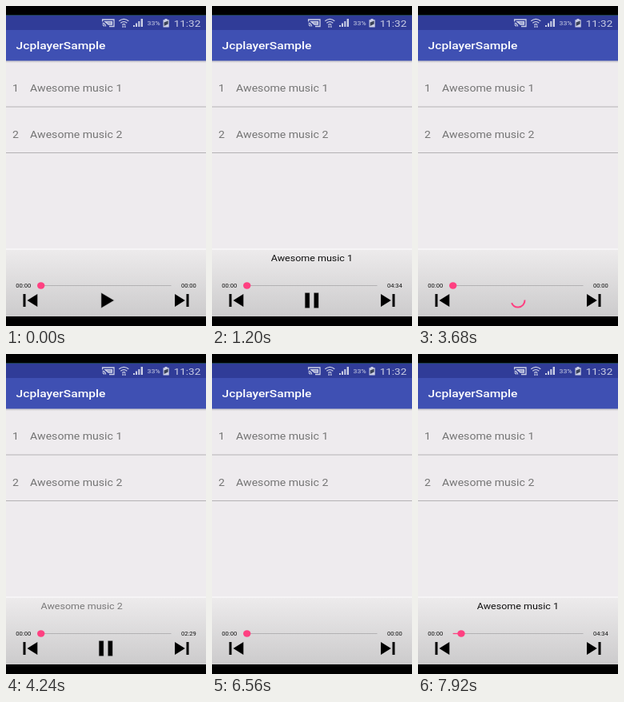
Write an HTML page that moves like this. It is 250 px wide and 400 px high and loops after 8 s.

```html
<!DOCTYPE html>
<html lang="en">
<head>
<meta charset="utf-8">
<title>Music player</title>
<style>
  html, body { margin: 0; width: 100%; height: 100%; overflow: hidden; background: #000; }
  svg { display: block; width: 100vw; height: 100vh; font-family: Roboto, "Noto Sans", sans-serif; }
  .row { font-size: 14.1px; fill: #757575; }
  .time { font-size: 7.6px; fill: #111; }
  .status { fill: #ccd0e6; }
  .icon { stroke: #000; stroke-opacity: .3; stroke-width: 1.2; }
</style>
</head>
<body>
<svg viewBox="0 0 250 400">
  <defs>
    <linearGradient id="panelFill" x2="0" y2="1">
      <stop offset="0" stop-color="#edebec"/>
      <stop offset="1" stop-color="#cccbcc"/>
    </linearGradient>
    <linearGradient id="shadowFill" x2="0" y2="1">
      <stop offset="0" stop-color="#000" stop-opacity=".16"/>
      <stop offset="1" stop-color="#000" stop-opacity="0"/>
    </linearGradient>
  </defs>
  <rect width="250" height="400"/>
  <rect y="11" width="250" height="1" fill="#1d4150"/>
  <rect y="12" width="250" height="18" fill="#303c98"/>
  <rect y="68" width="250" height="236" fill="#eeebee"/>
  <rect y="30" width="250" height="38.5" fill="#3f50b3"/>
  <rect y="68.5" width="250" height="3" fill="url(#shadowFill)"/>

  <!-- status icons -->
  <g fill="none" stroke="#ccd0e6" stroke-width="1.3">
    <path d="M120.600 19.500V17H135V25.500H129M120.600 21.500a4 4 0 0 1 4 4M120.600 23.600a2 2 0 0 1 2 2"/>
    <path d="M124 19.600H132.400V23H128z" fill="#8f97c8"/>
    <path d="M141.300 18.800q6-4.800 12 0M143.300 21.200q4-3 8 0M145.300 23.400q2-1.500 4 0M146.200 27v-2.500M148.800 27v-2.500"/>
  </g>
  <path class="status" d="M159 26v-2h2v2zM162 26v-4.500h2v4.500zM165.300 26v-7h2v7zM168.600 26v-10h2.400v10z"/>
  <path class="status" d="M198.500 16h3v1.300h2.200v9.200h-7.200v-9.200h2z"/>
  <path d="M197.600 20.500l5-2v4l-5 2.500z" fill="#3b4358"/>

  <!-- player panel -->
  <path d="M0 126H250M0 183.500H250" stroke="#b4b2b4"/>
  <rect y="304" width="250" height="84" fill="url(#panelFill)"/>
  <path d="M0 304H250" stroke="#f8f7f8" stroke-width="1.500"/>
  <path d="M43.700 349.500H206.500" stroke="#b3b1b3"/>
  <path id="played" stroke="#ff4081" stroke-width="1.300"/>
  <ellipse id="knob" fill="#ff4081" cy="349.500" rx="4.700" ry="4.200"/>
  <path d="M21.500 360h3v16h-3zM39.300 360v16L26.500 368zM228.500 360h-3v16h3zM211 360v16L223.800 368z"/>
  <path id="play" class="icon" d="M119.300 359V377L134.500 368z"/>
  <path id="pause" class="icon" d="M116.500 358.800h5.300v18.400h-5.300zM127.700 358.800h5.300v18.400h-5.300z"/>
  <ellipse id="spinner" cx="125" cy="368" rx="8.500" ry="8.500" pathLength="100" fill="none" stroke="#ff4081" stroke-width="2"/>

  <!-- the phone screen is shown slightly flattened, its lettering too -->
  <g transform="scale(1 .87)">
    <g class="status">
      <text x="176.500" y="27.600" font-size="8.800">33%</text>
      <text x="209.700" y="29.700" font-size="13.500">11:32</text>
    </g>
    <text x="12.600" y="62.200" font-size="15.600" font-weight="500" fill="#fff">JcplayerSample</text>
    <g class="row">
      <text x="7.900" y="122.900">1</text><text x="30.100" y="122.900">Awesome music 1</text>
      <text x="7.900" y="189.200">2</text><text x="30.100" y="189.200">Awesome music 2</text>
    </g>
    <text id="title" y="366.500" font-size="12.500" fill="#111"></text>
    <text id="elapsed" class="time" x="12.300" y="404.500"></text>
    <text id="total" class="time" x="219" y="404.500"></text>
  </g>
</svg>
<script>
const LOOP = 8000, STEP = 80, SPEED = 2.35;
const SLIDE_TIME = 255, SLIDE_WIDTH = 62.5, TITLE_X = 73.8;
const BAR_X = 43.7, BAR_WIDTH = 162.8;

// ticks: moments at which the player reports its position, one second apart
const songs = [
  { clear: 400, ready: 880, start: 945, name: "Awesome music 1", length: 274,
    ticks: [1280, 1680, 2160, 2560, 2960, 3360] },
  { clear: 3520, ready: 4080, start: 4110, name: "Awesome music 2", length: 149,
    ticks: [4560, 4960, 5280, 5760, 6160] },
  { clear: 6560, ready: 7360, start: 7380, name: "Awesome music 1", length: 274,
    ticks: [7760], seek: 7920, seekX: 54 }
];

const el = id => document.getElementById(id);
const set = (id, attrs) => {
  for (const key in attrs) el(id).setAttribute(key, attrs[key]);
};
const show = (id, on) => set(id, { visibility: on ? "visible" : "hidden" });
const clamp = v => Math.min(1, Math.max(0, v));
const ease = v => (1 - Math.cos(Math.PI * clamp(v))) / 2;
const pad = n => String(n).padStart(2, "0");
const clock = s => pad(Math.floor(s / 60)) + ":" + pad(s % 60);

function drawSpinner(age) {
  const cycles = age * SPEED / 1333, part = cycles % 1;
  const head = 75 * ease(part * 2), tail = 75 * ease(part * 2 - 1);
  const sweep = head - tail;
  const angle = -90 + 3.6 * tail + 90 * part + 216 * cycles;
  set("spinner", {
    "stroke-dasharray": `${sweep} ${100 - sweep}`,
    transform: `rotate(${angle} 125 368)`
  });
  show("spinner", sweep > 0.5);
}

function render(t) {
  const song = songs.filter(s => t >= s.clear).pop();
  const started = song && t >= song.start;
  const seeking = song && t >= song.seek;
  const loading = song && (t < song.ready || seeking);
  const ticks = song ? song.ticks.filter(k => t >= k).length : 0;

  const slide = started ? ease((t - song.start) / SLIDE_TIME) : 0;
  el("title").textContent = started ? song.name : "";
  set("title", { x: TITLE_X - SLIDE_WIDTH * (1 - slide), opacity: slide });

  el("elapsed").textContent = clock(Math.max(0, ticks - 1));
  el("total").textContent = clock(started ? song.length : 0);

  const position = ticks ? ticks - 0.55 : 0;
  const x = seeking ? song.seekX : BAR_X + (song ? BAR_WIDTH * position / song.length : 0);
  set("knob", { cx: x });
  set("played", { d: `M${BAR_X} 349.5H${x}` });

  show("play", !song);
  show("pause", song && !loading);
  if (loading) drawSpinner(t - (seeking ? song.seek : song.clear));
  else show("spinner", false);
}

const origin = performance.now();
function frame() {
  const t = (performance.now() - origin) % LOOP;
  render(Math.floor(t / STEP) * STEP);
  requestAnimationFrame(frame);
}
frame();
</script>
</body>
</html>
```
